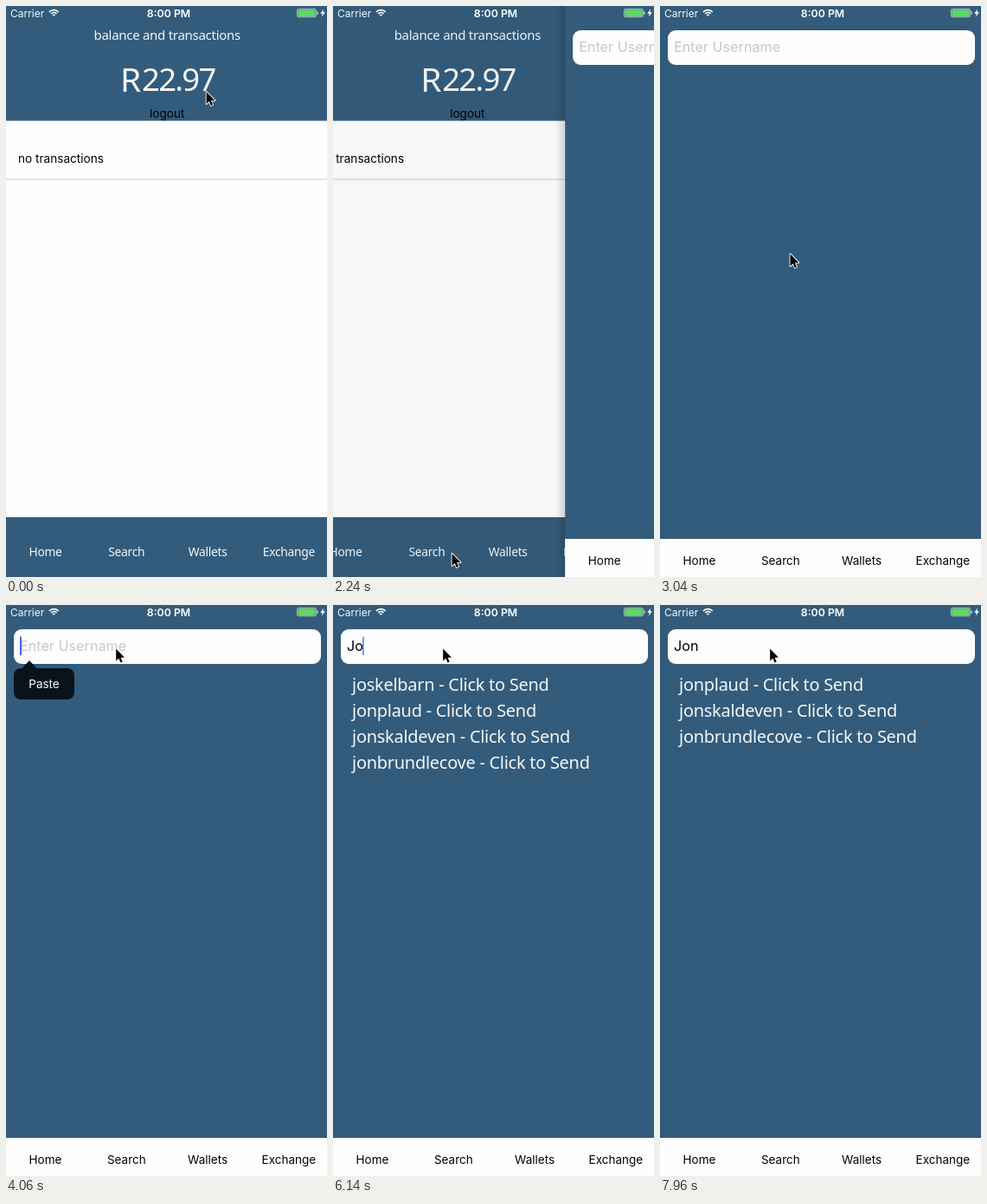
An HTML page with a canvas that plays this animation: 371 px wide and 659 px high, repeating every 8 s.

```html
<!DOCTYPE html>
<html lang="en">
<head>
<meta charset="utf-8">
<title>Wallet search</title>
<style>
html, body { margin: 0; width: 100%; height: 100%; overflow: hidden; background: #335b7b; }
canvas { display: block; width: 371px; height: 659px; }
</style>
</head>
<body>
<canvas id="stage"></canvas>
<script>
const W = 371, H = 659, LOOP = 8000;
const BLUE = '#335b7b', PALE = '#f4f7f9', PAPER = '#fefefe';
const UI = 'Inter, "Liberation Sans", sans-serif';
const BRAND = '"Noto Sans", "Open Sans", sans-serif';
const TABS = ['Home', 'Search', 'Wallets', 'Exchange'];
const USERS = ['joskelbarn', 'jonplaud', 'jonskaldeven', 'jonbrundlecove'];
const FOCUS = 3400;
const EDITS = [
  { at: 3520, query: '' }, { at: 4660, query: 'J' },
  { at: 5540, query: 'Jo' }, { at: 7210, query: 'Jon' }
];

const canvas = document.getElementById('stage');
const ctx = canvas.getContext('2d');
const dpr = window.devicePixelRatio || 1;
canvas.width = W * dpr;
canvas.height = H * dpr;

const ramp = (t, from, to) => Math.min(1, Math.max(0, (t - from) / (to - from)));
const ease = u => u * u * (3 - 2 * u);
const mix = (a, b, u) => a + (b - a) * u;
const tabX = i => 45.5 + 93.8 * i;

function box(x, y, w, h, color) {
  ctx.fillStyle = color;
  ctx.fillRect(x, y, w, h);
}

function round(x, y, w, h, r, color) {
  ctx.fillStyle = color;
  ctx.beginPath();
  ctx.roundRect(x, y, w, h, r);
  ctx.fill();
}

function poly(points) {
  ctx.beginPath();
  points.forEach(([x, y]) => ctx.lineTo(x, y));
  ctx.closePath();
}

function text(str, x, y, font, color, align = 'left', track = 0) {
  ctx.font = font;
  ctx.letterSpacing = track + 'px';
  ctx.textAlign = align;
  ctx.fillStyle = color;
  ctx.fillText(str, x, y);
}

function ui(str, x, y, size, color, align) {
  text(str, x, y, `${size}px ${UI}`, color, align);
}

function brand(str, x, y, size, align, track = -0.28) {
  text(str, x, y, `${size}px ${BRAND}`, PALE, align, track);
}

function faded(alpha, draw) {
  ctx.globalAlpha = alpha;
  draw();
  ctx.globalAlpha = 1;
}

// Critically damped push, held on a 90 ms refresh
function pushAmount(t) {
  if (t >= 2690) return 1;
  const held = 2150 + Math.floor((t - 2150) / 90) * 90;
  const s = Math.max(0, held - 2190) * 0.0207;
  return 1 - (1 + s) * Math.exp(-s);
}

// Caret stays lit after an edit, then blinks
function blink(age) {
  const phase = Math.max(0, age) % 1060;
  return 1 - ramp(phase, 540, 740) + ramp(phase, 1010, 1060);
}

function cursorAt(t) {
  const down = ease(ramp(t, 180, 1000)), up = ease(ramp(t, 2810, 3220));
  const bend = 20 * Math.sin(Math.PI * up) - 62 * Math.sin(Math.PI * down);
  const rest = 626 + 5 * ramp(t, 1940, 2060);
  return [
    mix(mix(231, 137, down), 126.6, up) + bend,
    mix(mix(98, rest, down), 49.5, up)
  ];
}

function drawBalance(t) {
  box(0, 0, W, H, BLUE);
  brand('balance and transactions', 186.2, 39, 15, 'center');
  brand('R', 132, 99, 39);
  brand('22.97', 157, 98, 36.5, 'left', -1.75);
  ui('logout', 186.2, 129, 13.6, '#000', 'center');
  box(0, 132.5, W, 457.5, PAPER);
  ui('no transactions', 14, 181, 13.6, '#000');
  box(0, 199, W, 2, '#e4e4e5');
  const press = ramp(t, 1930, 1990) - ramp(t, 2060, 2220);
  TABS.forEach((name, i) => {
    faded(name === 'Search' ? 1 - 0.65 * press : 1,
      () => brand(name, tabX(i), 635, 13.8, 'center'));
  });
}

function drawMenu() {
  round(9, 73, 70, 36, 8, '#08131b');
  poly([[18, 73.5], [27, 64], [36, 73.5]]);
  ctx.fill();
  ui('Paste', 44, 96, 13.5, '#fff', 'center');
}

function drawSearch(t) {
  box(0, 0, W, H, BLUE);
  round(9, 28, 355, 40, 9, PAPER);
  const { at, query } = EDITS.filter(e => e.at <= t).pop() || EDITS[0];
  ui(query || 'Enter Username', 16, 53, 16.2, query ? '#000' : '#c7c7cc');

  if (t >= FOCUS) {
    const x = 16 + (query && ctx.measureText(query).width - 1);
    faded(blink(t - at), () => box(x, 36.5, 2, 21.5, '#4a69e8'));
  }
  if (query.length > 1) {
    USERS.filter(u => u.startsWith(query.toLowerCase()))
      .forEach((u, i) => brand(u + ' - Click to Send', 22, 99 + i * 30, 20));
  }
  faded(ramp(t, 3800, 3940) - ramp(t, 4700, 4880), drawMenu);

  box(0, 615, W, 44, PAPER);
  TABS.forEach((name, i) => ui(name, tabX(i), 645, 13.5, '#000', 'center'));
}

function drawStatus() {
  ui('Carrier', 5, 12.5, 12, PALE);
  text('8:00 PM', 188, 12.5, `600 12.3px ${UI}`, '#fff', 'center');

  ctx.strokeStyle = '#fff';
  ctx.lineWidth = 1.6;
  [1.6, 4.4, 7.4].forEach(r => {
    ctx.beginPath();
    ctx.arc(55.3, 12, r, -Math.PI * 0.76, -Math.PI * 0.24);
    ctx.stroke();
  });

  ctx.lineWidth = 0.8;
  ctx.strokeStyle = '#c9d5de';
  ctx.beginPath();
  ctx.roundRect(336.4, 3.4, 22.2, 9.4, 2);
  ctx.stroke();
  round(337.3, 4.3, 20.4, 7.6, 1, '#5fd766');
  round(359.3, 6.3, 1.3, 3.6, 0.6, '#c9d5de');
  ctx.fillStyle = '#fff';
  poly([[367.2, 3.6], [363.2, 8.8], [365.7, 8.8], [364.8, 12.6], [369, 7.3], [366.4, 7.3]]);
  ctx.fill();
}

function drawCursor(x, y) {
  ctx.save();
  ctx.translate(x + 0.6, y + 1);
  poly([[0, 0], [0, 14], [3.2, 11], [5.3, 16], [7.5, 15], [5.4, 10.2], [9.8, 10]]);
  ctx.lineJoin = 'round';
  ctx.lineWidth = 1.8;
  ctx.strokeStyle = '#fff';
  ctx.stroke();
  ctx.fillStyle = '#000';
  ctx.fill();
  ctx.restore();
}

function drawPages(t) {
  const p = pushAmount(t), left = W * (1 - p);
  if (p < 1) {
    ctx.save();
    ctx.translate(-0.3 * W * p, 0);
    drawBalance(t);
    ctx.restore();
    box(0, 0, left, H, `rgba(0,0,0,${0.1 * p})`);
  }
  if (p <= 0) return;
  if (p < 1) {
    const shade = ctx.createLinearGradient(left - 11, 0, left, 0);
    shade.addColorStop(0, 'rgba(0,0,0,0)');
    shade.addColorStop(1, `rgba(0,0,0,${0.2 * (1 - p)})`);
    box(left - 11, 0, 11, H, shade);
  }
  ctx.save();
  ctx.translate(left, 0);
  drawSearch(t);
  ctx.restore();
}

function frame() {
  const t = performance.now() % LOOP;
  ctx.setTransform(dpr, 0, 0, dpr, 0, 0);
  drawPages(t);
  drawStatus();
  drawCursor(...cursorAt(t));
  requestAnimationFrame(frame);
}
frame();
</script>
</body>
</html>
```
